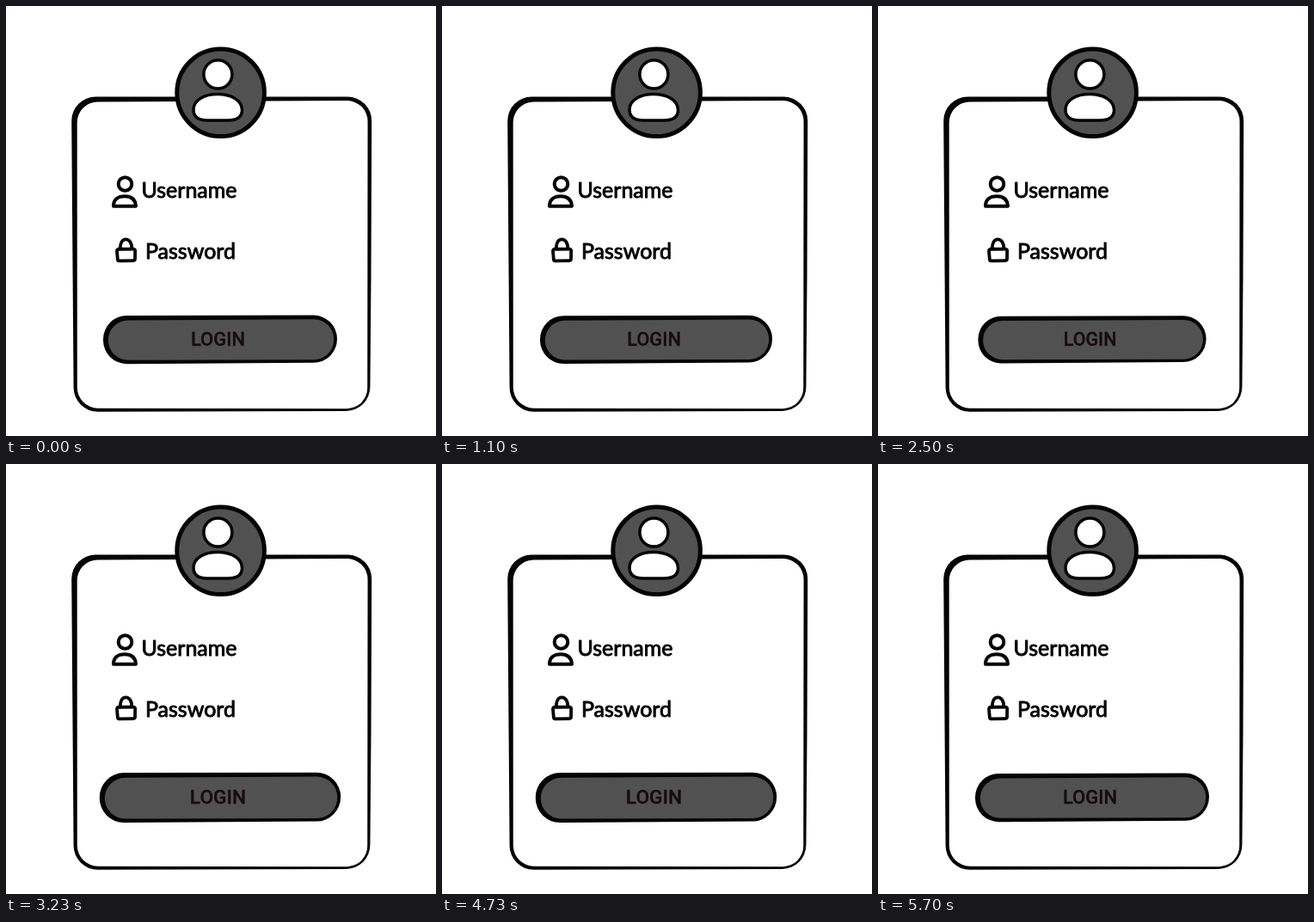
An HTML page with a canvas for the animation above (6010 ms loop, 500x500 px).

```html
<!DOCTYPE html>
<html lang="en">
<head>
<meta charset="utf-8">
<title>Login card</title>
<style>
  html, body { margin: 0; width: 100%; height: 100%; overflow: hidden; background: #fff; }
  canvas { display: block; width: 500px; height: 500px; }
</style>
</head>
<body>
<canvas id="stage" width="500" height="500"></canvas>
<script>
const ctx = document.getElementById('stage').getContext('2d');
const INK = '#050304', GRAY = '#525152', PAPER = '#fff';
const LOOP = 6010, BEAT = 1500, STEP = 400;
const CENTER = { x: 249, y: 388 };

// Polygon with rounded corners, for slightly uneven hand-drawn boxes
function roundPoly(points, r) {
  const [a] = points, last = points[points.length - 1];
  const path = new Path2D();
  path.moveTo((a[0] + last[0]) / 2, (a[1] + last[1]) / 2);
  points.forEach((p, i) => {
    const next = points[(i + 1) % points.length];
    path.arcTo(p[0], p[1], (p[0] + next[0]) / 2, (p[1] + next[1]) / 2, r);
  });
  path.closePath();
  return path;
}

function circle(x, y, r) {
  const path = new Path2D();
  path.arc(x, y, r, 0, Math.PI * 2);
  return path;
}

function fill(path, color) {
  ctx.fillStyle = color;
  ctx.fill(path);
}

function outline(path, width, color) {
  if (color) fill(path, color);
  ctx.strokeStyle = INK;
  ctx.lineWidth = width;
  ctx.stroke(path);
}

// Text with a thin round outline to soften the letter ends
function label(text, x, y, font, color, weight) {
  ctx.font = font;
  ctx.fillStyle = ctx.strokeStyle = color;
  ctx.lineWidth = weight;
  ctx.strokeText(text, x, y);
  ctx.fillText(text, x, y);
}

const card = {
  outer: roundPoly([[76, 105.6], [425.3, 105.5], [424.5, 315], [423.2, 470.8], [78.8, 471.8]], 28),
  inner: roundPoly([[82.7, 111.6], [420.6, 110], [420.2, 468.2], [82.8, 467.6]], 24)
};
const button = {
  outer: roundPoly([[113, 360], [385, 359.5], [385, 414.6], [113, 416.3]], 27.5),
  inner: roundPoly([[118.8, 365.6], [381.2, 364.2], [381.2, 411.2], [118.8, 411.8]], 23.2)
};
const torso = new Path2D(
  'M218 120.5C218 109 231 102.5 246 102.5C261 102.5 274.5 109 274.5 121' +
  'C274.5 130 267 133 258 133L234 133C225 133 218 130 218 120.5Z');
const shoulders = new Path2D('M125 232.7C125 225 130 221.2 138 221.2C146 221.2 150.5 225 151 232.7Z');
const lockBody = roundPoly([[128.8, 282.8], [150.2, 282.5], [150, 296], [130, 296.5]], 2);
const shackle = new Path2D('M132.8 282C132.8 276 135 271.3 139.3 271.3C143.6 271.3 146.4 276 146.4 282');

function drawCard() {
  fill(card.outer, INK);
  fill(card.inner, PAPER);
  outline(circle(249.6, 100.8, 50.8), 5, GRAY);
  outline(circle(246.4, 79.5, 16.5), 3.5, PAPER);
  outline(torso, 3.5, PAPER);

  outline(circle(138.5, 207, 7.8), 4);
  outline(shoulders, 4);
  outline(lockBody, 3.8);
  outline(shackle, 3.8);

  ctx.textAlign = 'left';
  ctx.textBaseline = 'alphabetic';
  label('Username', 157.5, 223, '25px Lato, sans-serif', INK, 0.9);
  label('Password', 162, 293.8, '25px Lato, sans-serif', INK, 0.9);
}

function drawButton(scale) {
  ctx.save();
  ctx.translate(CENTER.x, CENTER.y);
  ctx.scale(scale, scale);
  ctx.translate(-CENTER.x, -CENTER.y);
  fill(button.outer, INK);
  fill(button.inner, GRAY);
  ctx.textAlign = 'center';
  label('LOGIN', 246.5, 395, '500 22px Roboto, sans-serif', '#170b0d', 0.3);
  ctx.restore();
}

// Rest, swell, shrink, rest: three eased moves, then a pause
function pulse(t) {
  const stops = [1, 1.05, 0.95, 1];
  const i = Math.floor(t / STEP);
  if (i > 2) return 1;
  const k = (1 - Math.cos(Math.PI * (t / STEP - i))) / 2;
  return stops[i] + (stops[i + 1] - stops[i]) * k;
}

// The picture advances twice per 100 ms, at 0 and 30
function snap(t) {
  const base = Math.floor(t / 100) * 100;
  return t - base >= 30 ? base + 30 : base;
}

const start = performance.now();

function draw(now) {
  const t = snap(Math.max(0, now - start) % LOOP);
  ctx.fillStyle = PAPER;
  ctx.fillRect(0, 0, 500, 500);
  ctx.lineJoin = ctx.lineCap = 'round';
  drawCard();
  drawButton(t < 4 * BEAT ? pulse(t % BEAT) : 1);
  requestAnimationFrame(draw);
}

draw(start);
</script>
</body>
</html>
```
